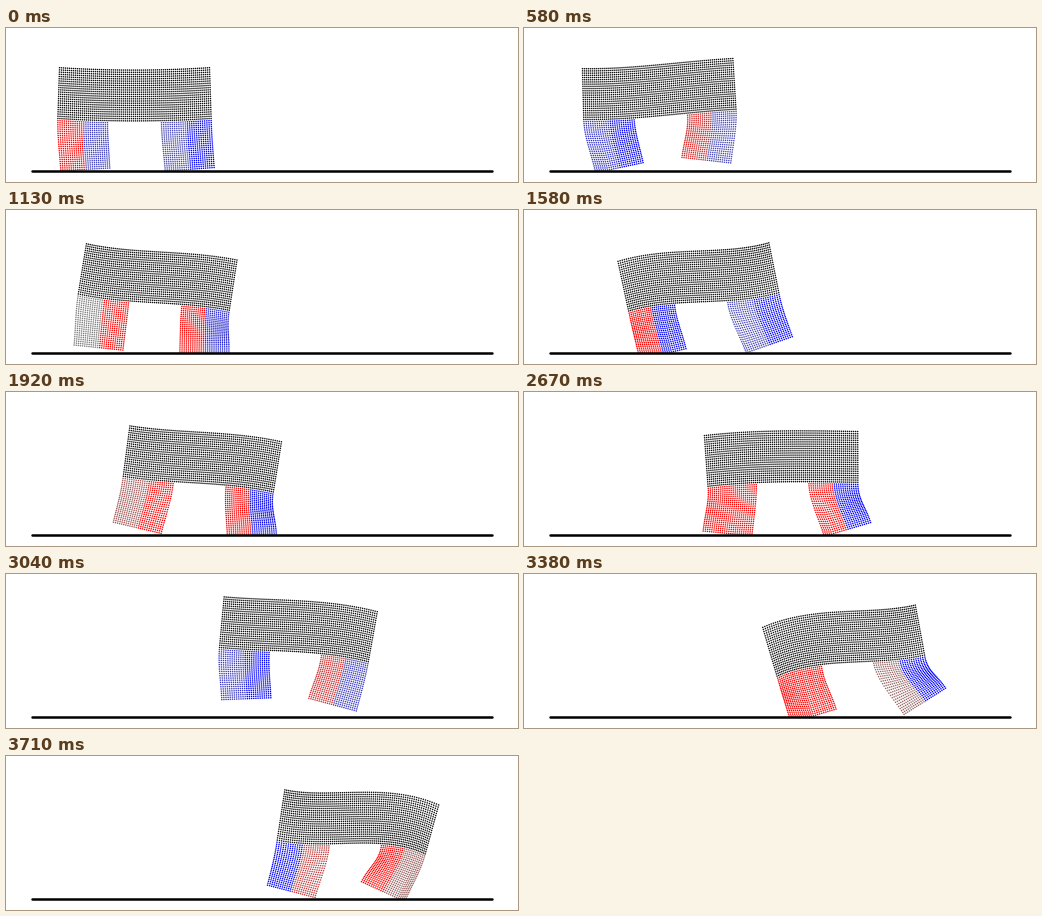
A matplotlib script that plays this animation: 512 px wide and 154 px high, repeating every 3.75 s.

```python
import numpy as np
import matplotlib.pyplot as plt
from matplotlib.animation import FuncAnimation
from matplotlib.patches import PathPatch
from matplotlib.path import Path

W, H, DPI = 512, 154, 100
LOOP_MS, TICK_MS, STEPS = 3750, 10, 90
GROUND = 143

BODY_W, BODY_H = 153.6, 53
LEG_W, LEG_LEN = 51.2, 49.5
DOT_R = 0.8

GAIT = 19.6        # steps in one muscle cycle
PITCH = 21.8       # steps in one rocking cycle
TOP_SPEED, RUN_UP = 3.7, 58

# Muscles from the back to the front: gain, step of the peak, offset
MUSCLES = [(0.75, 11.45, -0.27), (1.1, 15.8, -0.13),
           (0.6, 18.8, -0.62), (0.75, 1.2, 0.85)]


def wave(t, peak, period=GAIT):
    return np.cos(2 * np.pi * (t - peak) / period)


def hermite(x, p0, m0, p1, m1):
    return ((2 * x**3 - 3 * x**2 + 1) * p0 + (x**3 - 2 * x**2 + x) * m0
            + (3 * x**2 - 2 * x**3) * p1 + (x**3 - x**2) * m1)


def along(angle):
    return np.stack([np.cos(angle), np.sin(angle)], axis=-1)


def down(angle):
    return np.stack([-np.sin(angle), np.cos(angle)], axis=-1)


def travel(t):
    """Even acceleration up to a constant speed."""
    r = min(t, RUN_UP)
    return TOP_SPEED * (r * r / (2 * RUN_UP) + t - r)


class Pose:
    """Centre, tilt, bending and leg swing of the walker at step t."""

    def __init__(self, t):
        grow = 1 - np.exp(-t / 20)
        hop = 12 * grow * max(0, wave(t, 13.9))**4
        self.center = np.array([128.5 + travel(t), 67 - 2 * np.exp(-t / 4) - hop])
        self.tilt = np.radians(8.5 * grow * wave(t, 26.5, PITCH))
        self.sag = 2.5 - 0.08 * t
        self.bend = 9 * grow * wave(t, 0.6)
        self.back = np.radians(18 * grow * wave(t, 24.1, PITCH) - 3)
        self.front = np.radians(30 * grow * wave(t, 11.5) - 4)

    def body(self, u, v):
        """Map u, v in -1..1 to the bent beam; also give its cross direction."""
        half = BODY_W / 2
        dev = self.sag * (1 - u**2) + self.bend * (u - u**3)
        slope = (-2 * self.sag * u + self.bend * (1 - 3 * u**2)) / half
        cross = down(self.tilt + slope / 2)
        spine = (self.center + half * u[:, None] * along(self.tilt)
                 + dev[:, None] * down(self.tilt))
        return spine + v[:, None] * cross * BODY_H / 2, cross

    def leg(self, u0, swing, s, w):
        """Leg hanging from the beam at u0, s across and w along it."""
        top, cross = self.body(u0 + s * 2 / 3, np.ones_like(s))
        hip = self.body(np.array([u0 + 1 / 3]), np.ones(1))[0]
        sole = (hip + LEG_LEN * down(swing)
                + (s - 0.5)[:, None] * LEG_W * along(swing))
        sole[:, 1] = np.minimum(sole[:, 1], GROUND)
        return hermite(w[:, None], top, cross * LEG_LEN,
                       sole, down(swing) * LEG_LEN)


def muscle_color(t, gain, peak, offset):
    a = np.tanh(gain * (wave(t, peak) + offset))
    return np.clip([0.5 - a, 0.5 - abs(a), 0.5 + a], 0, 1)


def grid(cols, rows):
    x, y = np.meshgrid((np.arange(cols) + 0.5) / cols,
                       (np.arange(rows) + 0.5) / rows)
    return x.ravel(), y.ravel()


RING = DOT_R * along(np.linspace(0, 2 * np.pi, 9) + np.pi / 8)
RING_CODES = [Path.MOVETO] + [Path.LINETO] * 7 + [Path.CLOSEPOLY]


def dots(points):
    """One path made of a small octagon around every point."""
    verts = (points[:, None, :] + RING).reshape(-1, 2)
    return Path(verts, np.tile(RING_CODES, len(points)))


bu, bv = (2 * g - 1 for g in grid(76, 24))
ms, mw = grid(12, 24)

fig = plt.figure(figsize=(W / DPI, H / DPI), dpi=DPI, facecolor="white")
ax = fig.add_axes([0, 0, 1, 1])
ax.set_xlim(0, W)
ax.set_ylim(H, 0)
ax.axis("off")


def add_part(color):
    patch = PathPatch(dots(np.zeros((1, 2))), fc=color, lw=0, snap=False)
    return ax.add_patch(patch)


beam = add_part("#111111")
muscles = [add_part("gray") for _ in MUSCLES]
ax.plot([25.6, 486.4], [GROUND, GROUND], color="black", lw=2.5 * 72 / DPI,
        solid_capstyle="round", zorder=3)


def draw(tick):
    # The pose holds for one step; steps begin on whole ticks.
    t = int((tick * TICK_MS + 4) * STEPS / LOOP_MS)
    pose = Pose(t)
    beam.set_path(dots(pose.body(bu, bv)[0]))
    for i, patch in enumerate(muscles):
        u0, swing = (-1, pose.back) if i < 2 else (1 / 3, pose.front)
        patch.set_path(dots(pose.leg(u0, swing, (ms + i % 2) / 2, mw)))
        patch.set_facecolor(muscle_color(t, *MUSCLES[i]))
    return [beam, *muscles]


anim = FuncAnimation(fig, draw, frames=LOOP_MS // TICK_MS, interval=TICK_MS,
                     repeat=True, repeat_delay=0, blit=False)
plt.show()
```
